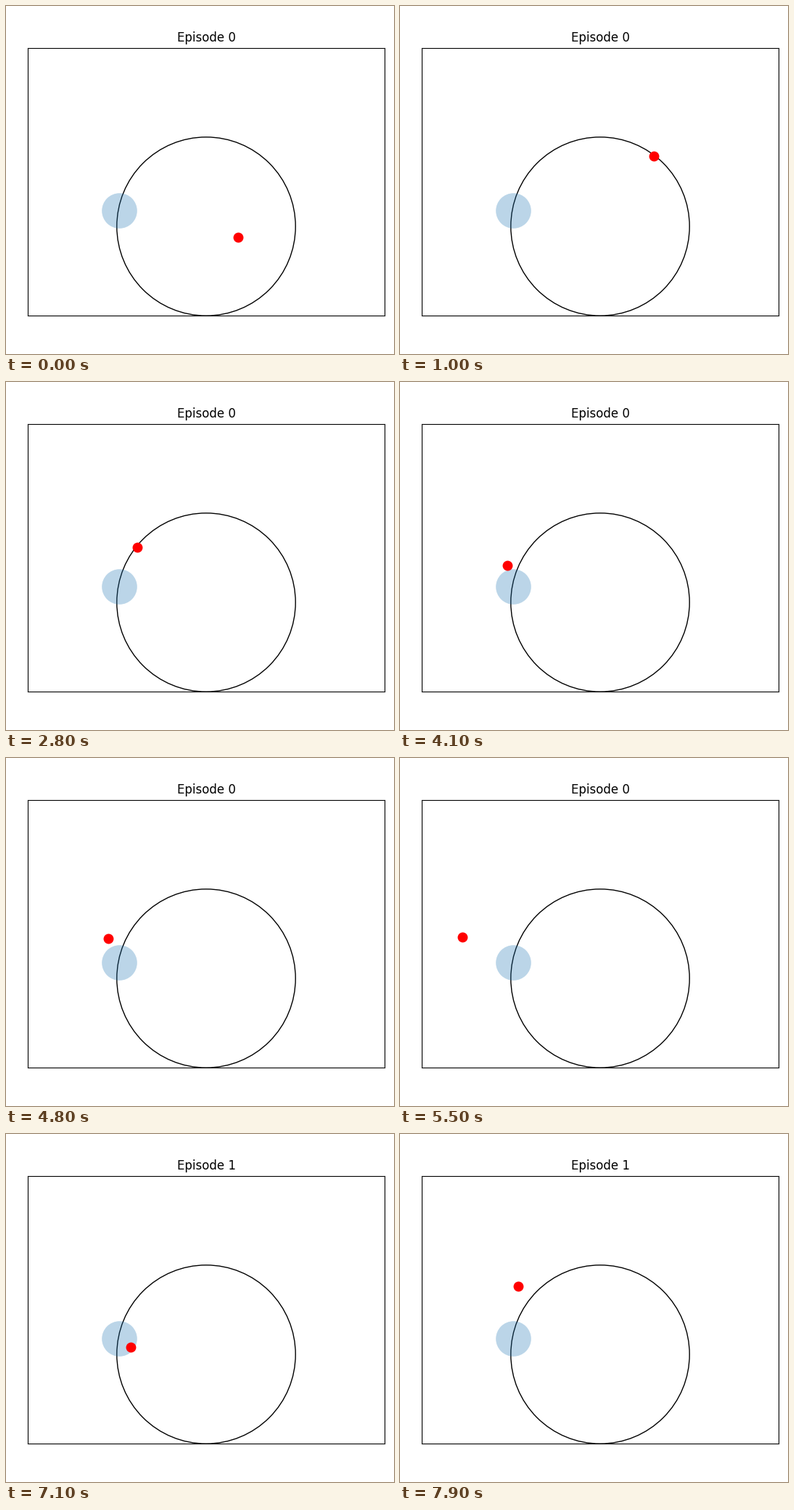
Write a matplotlib script that moves like this. It is 535x480 px and loops after 8000 ms.

```python
import numpy as np
import matplotlib.pyplot as plt
from matplotlib.animation import FuncAnimation
from matplotlib.patches import Circle

W, H, DPI = 535, 480, 100
FRAMES, INTERVAL = 80, 100
ORBIT, HUNT, RESET = 8, 26, 60  # first step of each later phase
CX, CY, UNIT = 276, 304, 123.2  # ring centre and radius in pixels

# turning points as (step, x, y) in pixels; straight runs between them
SWEEP = [(0, 319.5, 318.5), (3, 169, 262), (8, 370, 226)]
SWINGS = [(26, 169, 252), (28, 180.5, 227.5), (33, 152, 299), (38, 150, 246),
          (41, 147.5, 252.5), (47, 156, 251), (53, 63, 241), (55, 85.5, 246.5), (59, 74, 251)]
SECOND = [(60, 298, 306), (63, 272.5, 283.5), (66, 232, 267), (72, 160, 299), (79, 162.5, 209.5)]


def to_data(x, y):
    return (x - CX) / UNIT, (CY - y) / UNIT


def along(points, step):
    t, x, y = np.array(points).T
    return to_data(np.interp(step, t, x), np.interp(step, t, y))


def orbit(step):
    angle = np.radians(40 + 6.44 * (step - ORBIT))
    return 0.99 * np.cos(angle), 0.99 * np.sin(angle)


def position(step):
    if step < ORBIT:
        return along(SWEEP, step)
    if step < HUNT:
        return orbit(step)
    return along(SWINGS if step < RESET else SECOND, step)


plt.rcParams["font.family"] = "DejaVu Sans"
fig = plt.figure(figsize=(W / DPI, H / DPI), dpi=DPI, facecolor="white")
ax = fig.add_axes([29.6 / W, 52.8 / H, 492.8 / W, 369.6 / H])
ax.set(xlim=(-2, 2), ylim=(-1, 2), xticks=[], yticks=[])
title = ax.set_title("Episode 0", fontsize=12)

ax.add_patch(Circle((0, 0), 1, fill=False, ec="black", lw=1))
goal_x, goal_y = to_data(155.5, 281.5)
ax.plot([goal_x], [goal_y], "o", ms=35, mew=0, color="tab:blue", alpha=0.3)
agent, = ax.plot([], [], "o", ms=9, mew=1, color="red")


def update(step):
    x, y = position(step)
    agent.set_data([x], [y])
    title.set_text(f"Episode {int(step >= RESET)}")
    return agent, title


anim = FuncAnimation(fig, update, frames=FRAMES, interval=INTERVAL,
                     repeat=True, repeat_delay=0, blit=False)
plt.show()
```
